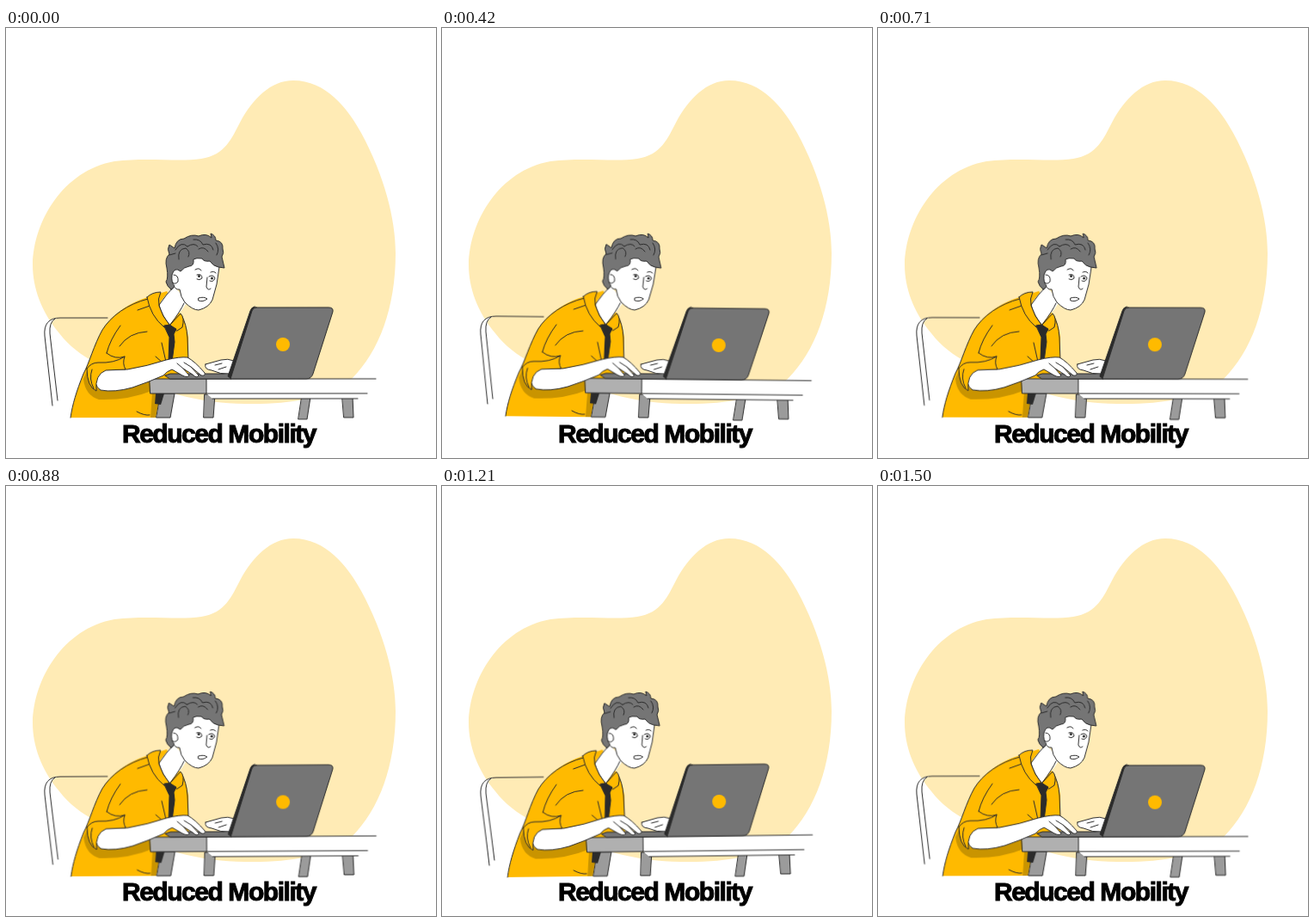
An HTML page for the animation above (1.54 s loop, 500 by 500 pixels).

```html
<!DOCTYPE html>
<html lang="en">
<head>
<meta charset="utf-8">
<title>Reduced Mobility</title>
<style>
  html, body { margin: 0; width: 100%; height: 100%; overflow: hidden; background: #fff; }
  svg { display: block; width: 100%; height: 100%; }
  .scene {
    fill: none; stroke: #2b2b2b; stroke-width: 1;
    stroke-linecap: round; stroke-linejoin: round;
    transform-origin: 236px 348px;
    animation: sway 770ms cubic-bezier(.37, 0, .63, 1) -385ms infinite alternate;
  }
  @keyframes sway {
    from { transform: rotate(-.7deg); }
    to { transform: rotate(.62deg); }
  }
  .white { fill: #fff; }
  .amber { fill: #ffba00; }
  .shade { fill: #c99400; stroke: none; }
  .grey { fill: #757575; }
  .leg { fill: #9b9b9b; }
  .slab { fill: #b0b0b0; }
  .dark { fill: #2b2b2b; }
  .flat { stroke: none; }
  .caption {
    font: bold 30px "Liberation Sans", Arial, sans-serif;
    letter-spacing: -1.45px; text-anchor: middle;
    fill: #000; stroke: #000; stroke-width: 1;
  }
</style>
</head>
<body>
<svg viewBox="0 0 500 500">
  <path fill="#ffebb5" d="M334 61C372 61 397 93 413 122C440 172 453 222 453 262C453 325 434 376 402 408C372 432 325 438 278 437C225 436 190 425 160 412C120 398 85 385 62 355C41 330 31 302 31 275C32 225 66 166 126 155C165 150 200 156 227 152C255 148 263 127 272 110C287 82 308 61 334 61Z"/>

  <g class="scene">
    <!-- chair -->
    <path class="white flat" d="M54 439L45 358Q43 338 60 337Q50 341 51 355L60 433Z"/>
    <path d="M54 439L45 358Q43 337 63 337H118M57 338Q50 342 51 355L60 433"/>

    <!-- shirt -->
    <path class="amber flat" d="M165 313C141 320 122 335 112 351C102 369 97 389 90 402C82 422 77 438 75 453H174L178 420L212 404V360Q209 341 204 334L187 306Z"/>
    <path d="M165 315C141 321 122 335 112 351C102 369 97 389 90 402C82 422 77 438 75 453M204 334Q210 344 211 360L212 386"/>
    <path class="shade" d="M90 408Q92 427 108 432Q142 433 169 422L170 410Q140 422 116 422Q97 420 95 396ZM170 424L180 424L174 453H168Z"/>
    <path d="M170 322L153 328M133 346Q121 362 117 378M164 353Q143 354 132 370M152 446Q161 451 167 450M181 366L186 388M174 382L183 390"/>

    <!-- neck and head -->
    <path class="white flat" d="M195 300Q187 309 180 318L178 325Q184 339 190 345L205 327L211 318Z"/>
    <path d="M195 301Q187 309 178 322Q181 334 190 345M207 320Q203 329 191 345"/>
    <path class="white" d="M199 278C192 278 190 288 193 297Q197 305 202 304Q203 313 208 319Q217 328 224 328Q236 325 240 316Q246 299 248 278L232 265L210 266Z"/>
    <path class="grey" d="M192 304Q187 300 186 295Q189 291 187 279Q184 268 190 263Q187 257 190 252L196 256Q198 245 207 245Q216 239 224 242Q233 238 239 244L238 239Q244 241 244 247Q253 248 252 257Q254 261 251 266L254 279L247 278Q241 277 237 271Q230 272 228 268Q221 267 218 269Q219 277 213 277Q207 278 203 283Q196 277 193 287Q192 296 196 300Q194 304 192 304Z"/>
    <path d="M197 258Q204 247 211 254M201 269Q199 257 209 256Q215 260 212 266M218 246Q226 245 229 252Q239 249 241 258M224 257Q230 253 235 260M244 250Q249 257 245 264M190 264L197 262M211 254Q219 249 223 254"/>
    <path d="M195 287Q201 287 200 295Q196 299 194 296M220 281Q225 278 227 282M238 284Q242 282 244 285M222 287Q228 285 228 291Q225 294 222 292M236 289Q241 286 243 291Q241 296 237 294M234 290L233 301Q235 306 238 303M224 314Q230 312 234 315Q229 319 224 317Z"/>
    <circle class="dark flat" cx="224.5" cy="288.5" r="1.5"/>
    <circle class="dark flat" cx="239.5" cy="291" r="1.5"/>

    <!-- collar and tie -->
    <path class="amber" d="M164 313Q170 307 180 307Q176 315 178 323Q182 336 190 345L184 348Q168 335 164 313Z"/>
    <path class="amber" d="M191 345L203 332Q208 337 205 348L199 352Z"/>
    <path class="dark" d="M184 346L190 345L198 350L195 356L196 365L193 388L189 386L190 360Z"/>

    <!-- table -->
    <path class="leg" d="M180 425H196L191 453H175ZM231 426H243L241 453H230ZM344 429H354L350 455H340ZM391 429H403L404 453H393Z"/>
    <path class="dark flat" d="M174 425H184L180 438L173 437Z"/>
    <path class="white flat" d="M233 408H430L420 425L409 431H240L233 425Z"/>
    <path class="slab" d="M167 408H233V425H168Z"/>
    <path d="M233 408H430M233 425H420M240 431H409"/>

    <!-- laptop -->
    <path class="grey" d="M185 404L191 402L262 402V408H191Z"/>
    <path class="white" d="M232 391L250 386Q258 384 265 387L261 402Q249 403 239 398Q230 397 232 391Z"/>
    <path d="M243 392L251 390M247 397L256 394"/>
    <path class="dark" d="M289 324Q285 325 284 329L258 405L262 408L291 326Z"/>
    <path class="grey" d="M291 325H375Q381 325 380 330L357 402Q355 408 349 408H261L286 329Q287 325 291 325Z"/>
    <circle class="amber flat" cx="322" cy="368" r="8"/>

    <!-- near arm -->
    <path class="white" d="M104 398Q124 396 141 397Q165 393 186 386Q202 382 211 383Q220 388 231 401Q232 405 227 404L215 394L224 404Q222 408 217 403L206 396L213 404Q211 407 205 404L193 397Q187 399 183 404Q165 412 147 418Q126 424 110 421Q101 416 104 398Z"/>
    <path d="M199 390L206 396M207 389L215 394"/>
    <path class="amber" d="M94 396Q99 389 107 389Q126 390 138 382Q135 390 139 397L116 398Q103 403 105 422Q94 417 94 396Z"/>
    <path d="M100 397Q96 408 102 419M117 378Q127 386 138 382"/>
  </g>

  <text class="caption" x="247.5" y="481.5">Reduced Mobility</text>
</svg>
</body>
</html>
```
